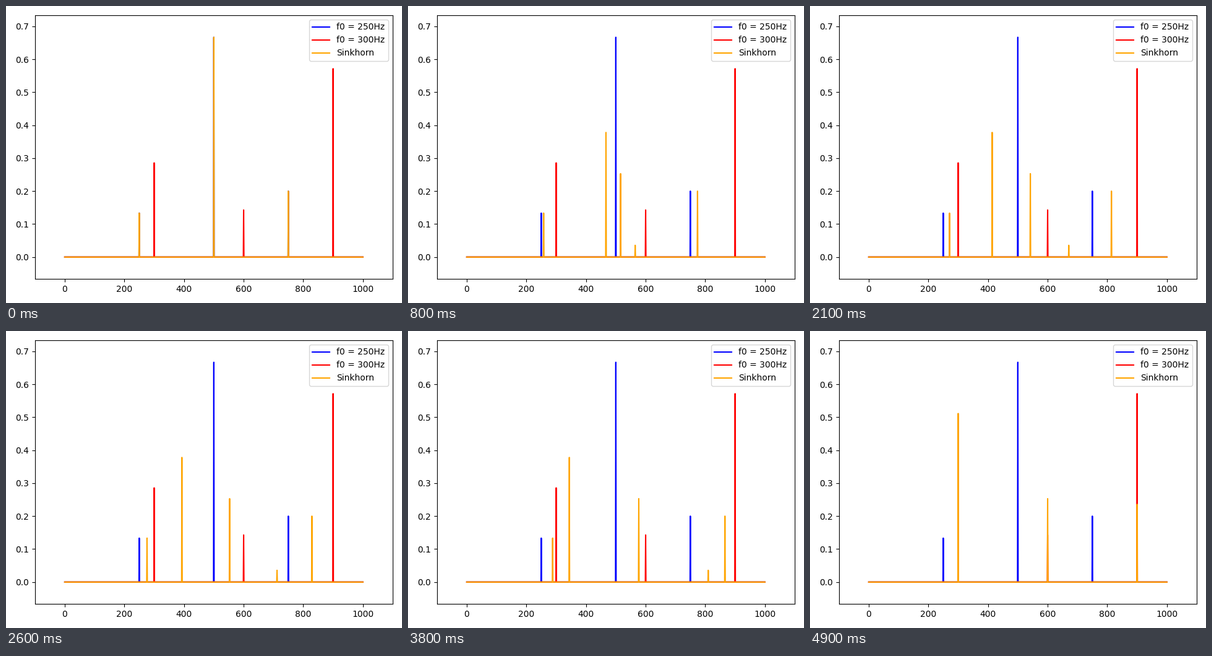
Recreate the animation shown at these times as a matplotlib script. Size 640 by 480 pixels, loop 5 s.

```python
import numpy as np
import matplotlib.pyplot as plt
from matplotlib.animation import FuncAnimation

FRAMES = 50
freqs = np.arange(1001)

# Transport plan: (start Hz, end Hz, mass)
PLAN = [
    (250, 300, 2 / 15),
    (500, 300, 0.378),
    (500, 600, 0.253),
    (500, 900, 2 / 3 - 0.378 - 0.253),
    (750, 900, 0.2),
]


def spectrum(peaks):
    values = np.zeros(len(freqs))
    for freq, mass in peaks:
        values[int(freq)] += mass
    return values


def interpolated(t):
    return spectrum((a + (b - a) * t, mass) for a, b, mass in PLAN)


plt.rcParams["font.family"] = "DejaVu Sans"
fig, ax = plt.subplots(figsize=(6.4, 4.8), dpi=100)
ax.margins(0.1)

source = spectrum([(250, 2 / 15), (500, 10 / 15), (750, 3 / 15)])
target = spectrum([(300, 2 / 7), (600, 1 / 7), (900, 4 / 7)])
ax.plot(freqs, source, color="blue", label="f0 = 250Hz")
ax.plot(freqs, target, color="red", label="f0 = 300Hz")
line, = ax.plot(freqs, interpolated(0), color="orange", label="Sinkhorn")
ax.legend(loc="upper right")
fig.tight_layout()


def update(i):
    line.set_ydata(interpolated(i / (FRAMES - 1)))
    return line,


anim = FuncAnimation(fig, update, frames=FRAMES, interval=100,
                     repeat=True, repeat_delay=0)
plt.show()
```
